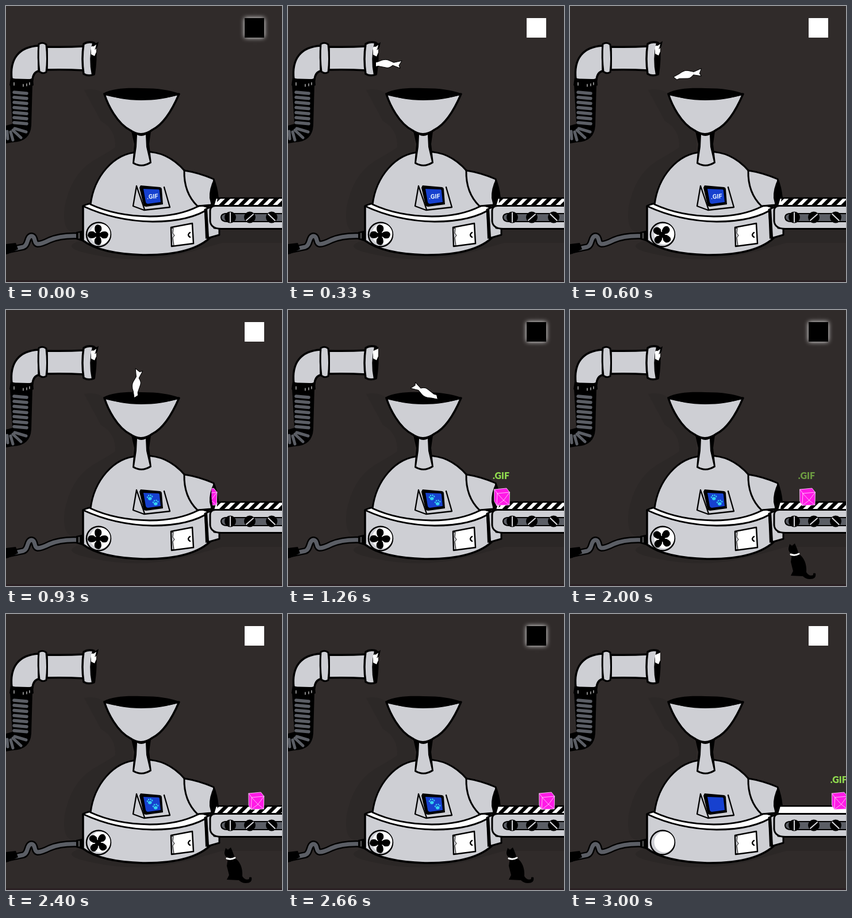
An HTML page with a canvas that plays this animation: 480 px wide and 480 px high, repeating every 3070 ms.

```html
<!DOCTYPE html>
<html lang="en">
<head>
<meta charset="utf-8">
<title>GIF machine</title>
<style>
html, body { margin: 0; width: 100%; height: 100%; overflow: hidden; background: #302b2a; }
canvas { display: block; width: 100vw; height: 100vh; }
</style>
</head>
<body>
<canvas id="stage" width="480" height="480"></canvas>
<script>
const ctx = document.getElementById('stage').getContext('2d');
const LOOP = 3070, FRAMES = 46;
const BACK = '#302b2a', GREY = '#cecfd4', DARK = '#5b5e65', INK = '#000', PINK = '#ff1ae6';

function shape(d, fill, stroke, width = 3) {
  const p = new Path2D(d);
  if (fill) { ctx.fillStyle = fill; ctx.fill(p); }
  if (stroke) { ctx.strokeStyle = stroke; ctx.lineWidth = width; ctx.stroke(p); }
}

function oval(x, y, rx, ry, fill, stroke, width = 3) {
  ctx.beginPath();
  ctx.ellipse(x, y, rx, ry, 0, 0, Math.PI * 2);
  if (fill) { ctx.fillStyle = fill; ctx.fill(); }
  if (stroke) { ctx.strokeStyle = stroke; ctx.lineWidth = width; ctx.stroke(); }
}

function at(x, y, turn, draw) {
  ctx.save();
  ctx.translate(x, y);
  ctx.rotate(turn);
  draw();
  ctx.restore();
}

// Value between [frame, value] stops
function track(f, stops) {
  if (f <= stops[0][0]) return stops[0][1];
  for (let k = 1; k < stops.length; k++) {
    const [a, u] = stops[k - 1], [b, v] = stops[k];
    if (f <= b) return u + (v - u) * (f - a) / (b - a);
  }
  return stops[stops.length - 1][1];
}

function backdrop() {
  ctx.fillStyle = BACK;
  ctx.fillRect(0, 0, 480, 480);
  shape('M136 146 Q160 142 172 154 L220 226 V254 L150 345 L134 400 L112 392 Q98 385 102 350 Q112 295 150 270 Q178 254 190 246 Q192 215 165 200 Z', '#2c2827');
  shape('M130 408 Q90 420 150 432 Q240 452 330 425 L376 412 H480 V384 H360 Z', '#2b2726');
  ctx.fillStyle = '#2a2023';
  ctx.fillRect(0, 477, 480, 3);
}

function hose() {
  shape('M7 136 H46 L44 208 Q42 236 12 237 L0 239 V208 L11 205 Z', INK);
  for (let k = 0; k < 7; k++) {
    const y = 150 + k * 8.8;
    shape(`M14 ${y} L36 ${y + 2}`, null, DARK, 5.5);
  }
  shape('M15 213 L35 219 M12 216 L26 229 M8 219 L12 233 M2 218 L3 231', null, DARK, 5);
}

function pipe(f) {
  hose();
  shape('M10 128 C6 92 22 71 57 69 V113 Q47 115 46 129 Z', GREY, INK, 3.5);
  shape('M8 124 Q28 133 47 125 L48 138 Q27 147 6 138 Z', INK);
  shape('M14 133 v5 M30 136 v4 M36 135 v4 M41 133 v4', null, '#ddd', 1.2);
  shape('M71 71 Q103 72 136 70 V112 Q103 110 71 111 Z', GREY, INK, 3.5);
  shape('M57 66 Q64 62 70 67 Q73 92 70 115 Q64 119 58 114 Q55 90 57 66 Z', GREY, INK, 3);
  shape('M135 66 Q143 61 153 64 V119 Q143 123 135 118 Q131 92 135 66 Z', GREY, INK, 3.5);
  shape('M150 64 L157 64 Q159 92 155 119 L149 120 Q143 92 150 64 Z', INK);
  const phase = f % 13, tucked = phase > 5 && phase < 8;
  const sway = Math.sin(phase / 13 * Math.PI * 2) * 1.2;
  at(0, sway, 0, () => {
    shape('M148 71 L157 67 L157 80 L154 87 L148 84 Z', '#fff');
    if (!tucked) {
      shape('M151 69 L161 62 L159 72 L155 76 Z', INK);
      shape('M150 72 L157 67 L155 75 Z', '#fff');
    }
  });
}

function cord() {
  const d = 'M0 425 Q16 422 30 419 C39 416 36 401 44 400 C52 400 48 413 55 414 Q62 414 76 407 Q96 398 130 400';
  shape(d, null, INK, 12);
  shape(d, null, DARK, 7);
  shape('M0 414 L17 412 L21 423 L4 431 L0 432 Z', INK);
  shape('M122 393 L136 390 V410 L122 406 Z', INK);
  shape('M127 395 v9', null, '#bbb', 1);
}

function fan(f) {
  oval(161, 397.5, 21, 21, GREY, INK, 2.5);
  oval(164, 396.5, 17.5, 18, '#fff');
  if (f === FRAMES - 1) return;
  // Upright and diagonal poses alternate, seven times a loop
  const upright = Math.cos(f / FRAMES * 7 * Math.PI * 2) > 0;
  at(160, 398, upright ? 0 : Math.PI / 4 - 0.1, () => {
    for (let k = 0; k < 4; k++) {
      ctx.rotate(Math.PI / 2);
      shape('M0 0 L-5 -6 Q-8 -16 -1 -18 Q8 -17 6 -8 Z', INK);
    }
    oval(0, 0, 5, 5, INK);
  });
}

function paw(x, y) {
  at(x, y, -0.15, () => {
    oval(0, 2, 3.3, 2.7, '#35d3f2');
    for (const [px, py] of [[-4, -1], [-1.5, -3.5], [2, -3.5], [4.5, -1]]) oval(px, py, 1.1, 1.5, '#35d3f2');
  });
}

function screen(f) {
  shape('M227 313 L221 349 L238 355 L284 351 L275 315 Z', GREY);
  shape('M227 313 L221 348 L240 355 L285 350 L275 315 M227 313 L241 354', null, INK, 2.3);
  shape('M234 312 L268 315 Q271 316 271 319 L273 345 L244 349 Q240 349 239 346 L232 316 Z', INK);
  shape('M239 318 L265 319 Q267 319 267 322 L269 341 L247 344 Q244 344 243 341 Z', '#1741cf');
  if (f === FRAMES - 1) return;
  if (f < 13) {
    ctx.font = 'bold 11px Roboto, sans-serif';
    ctx.fillStyle = '#e9f6ff';
    ctx.textAlign = 'center';
    at(255, 335, -0.09, () => ctx.fillText('.GIF', 0, 0));
  } else {
    paw(250, 326);
    paw(260, 335);
  }
}

function base() {
  shape('M134 348 Q145 343 160 343 H335 L355 351 L358 400 Q325 434 238 433 Q165 431 134 408 Z', GREY, INK, 3.5);
  shape('M134 348 Q145 342 160 343 L335 345 L355 351 Q320 375 255 375 Q190 374 134 348 Z', '#fff', INK, 3);
  shape('M346 354 L357 349 L362 386 L371 387 V398 L350 404 Z', GREY, INK, 3);
  shape('M345 356 L350 352 L353 402 L347 405 Z', INK);
  shape('M287 385 L324 378 L326 413 L288 418 Z', '#fff', INK, 2.5);
  shape('M288 387 L291 386 L290 395 L293 399 L290 403 L292 416 L289 417 Z', GREY, INK, 1);
  shape('M320 394 Q314 398 320 402', null, INK, 2.5);
}

function dome() {
  shape('M147 345 C153 298 186 256 230 254 C266 250 291 264 311 287 L335 348 Q300 366 250 366 Q190 365 147 345 Z', GREY, INK, 3);
  shape('M310 286 Q336 290 361 301 Q368 322 357 346 L333 348 Q309 325 310 286 Z', GREY, INK, 3);
  shape('M362 300 Q353 318 354 334 L357 347 L370 347 L370 334 Q368 314 362 300 Z', INK);
}

function funnel() {
  shape('M218 218 L252 218 L249 240 L253 273 Q236 284 220 274 L223 240 Z', INK);
  shape('M228 224 Q235 228 243 224 L244 245 L250 271 Q236 280 223 272 L227 245 Z', GREY);
  shape('M171 153 C177 172 193 204 216 216 Q235 230 255 215 C277 204 292 174 301 153 Q236 170 171 153 Z', GREY, INK, 3.5);
  shape('M169 152 C185 143 210 142 235 143 C265 143 285 146 303 153 C282 161 258 164 235 164 C210 164 188 160 169 152 Z', INK);
}

function belt(f) {
  shape('M366 334 H480 V348 H362 Z', '#fff');
  if (f < FRAMES - 1) {
    ctx.save();
    ctx.clip(new Path2D('M368 334 H480 V346 H366 Z'));
    const shift = f * 3.7 % 17;
    for (let x = 334 + shift; x < 500; x += 17) {
      shape(`M${x} 348 l15 -15 h9 l-15 15 Z`, INK);
    }
    ctx.restore();
  }
  shape('M366 334 H480', null, INK, 2.5);
  shape('M485 347.5 H364 Q355 348 355 356 V374 Q356 387 374 387.5 H485 Z', GREY, INK, 3);
  shape('M485 361 H381 Q374 362 374 368 Q375 375 384 375 H485 Z', DARK, INK, 2);
  for (const [x, turn] of [[390, 0], [424, 0.85], [462, -0.8]]) {
    oval(x, 367.5, 10, 10, INK);
    at(x, 367.5, turn, () => shape('M0 -8 V8', null, '#d8d8dc', 2));
  }
}

function cube(f) {
  if (f < 13) return;
  const x = 372 + (f - 19) * 3.72;
  ctx.save();
  ctx.clip(new Path2D('M359 280 H480 V350 H362 Q354 325 359 300 Z'));
  at(x, 325, 0, () => {
    shape('M-13 -13 L8 -15 L13.5 -8 L13 14 L-9 15 L-13 8 Z', PINK);
    shape('M-13 -13 L8 -15 L13.5 -8 L13 14 L-9 15 L-13 8 Z M-13 -13 L-8 -6 L13.5 -8 M-8 -6 L-9 15 M-8 -6 L3 6 L13 14 M13.5 -8 L3 6 L-9 15', null, '#ffc9fa', 0.9);
  });
  ctx.restore();

  const glow = 0.15 + 1.1 * Math.cos((f - 19.3) / 13 * Math.PI * 2);
  ctx.globalAlpha = Math.max(0, Math.min(1, glow));
  ctx.font = '900 16px Lato, sans-serif';
  ctx.fillStyle = '#8fd94e';
  ctx.textAlign = 'center';
  ctx.fillText('.GIF', x - 1.5, 294);
  ctx.globalAlpha = 1;
}

function fish(f) {
  if (f < 3 || f > 24) return;
  const x = track(f, [[3, 156], [9, 204], [14, 226], [19, 238], [24, 242]]);
  const y = track(f, [[3, 90], [6, 104], [9, 118], [14, 128], [19, 144], [24, 178]]);
  const turn = track(f, [[3, 0.1], [9, -0.22], [19, -2.68], [24, -3.6]]);
  ctx.save();
  ctx.clip(new Path2D('M153 0 H480 V153 H303 Q270 163 235 163 Q195 162 169 152 H153 Z'));
  at(x, y, turn, () => {
    shape('M-25 0 L-14 -3 Q-4 -8 3 -5 L12 -1 L26 -4 L21 4 L23 9 L10 4 Q4 9 -1 8 L-15 5 L-20 6 Z', '#fff', INK, 1);
  });
  ctx.restore();
}

function sittingCat() {
  shape('M380 414 L382 407 L386 410 L391 406 L394 413 L398 424 C407 431 412 441 411 456 Q416 464 423 461 Q422 456 427 458 Q429 468 417 468 Q410 468 405 463 L384 462 L388 454 L384 438 L386 425 Q379 420 380 414 Z', INK);
  shape('M384 425 Q391 428 398 424', null, '#fff', 3);
}

function walkingCat(x, f) {
  const step = Math.sin(f * 1.1) * 5;
  at(x, 0, 0, () => {
    shape('M-1 424 L6 428 L14 427 L19 422 L21 432 Q35 434 50 439 Q66 437 74 446 L92 453 V459 L78 459 Q72 463 62 460 Q45 462 25 459 Q14 455 12 446 Q2 442 0 434 Z', INK);
    for (const [top, side] of [[19, 2], [30, -1], [56, 1], [66, -1]]) {
      const foot = top + side * step;
      shape(`M${top} 452 L${(top + foot) / 2 + 2} 458 L${foot} 463 L${foot - 3} 464`, null, INK, 5.5);
    }
    shape('M11 441 Q17 441 20 437', null, '#fff', 2);
  });
}

function cat(f) {
  if (f < 20 || f === FRAMES - 1) return;
  if (f < 29) walkingCat(400 + (26 - f) * 12, f);
  else sittingCat();
}

function badge(f) {
  const dark = Math.floor(f / 4.6) % 2 === 0;
  ctx.save();
  if (dark) { ctx.shadowColor = '#fff'; ctx.shadowBlur = 8; }
  ctx.fillStyle = dark ? INK : '#fff';
  ctx.fillRect(415, 21, 34, 34);
  ctx.restore();
}

function draw(now) {
  const t = now % LOOP;
  const f = Math.min(FRAMES - 1, Math.ceil((Math.floor(t / 10) + 1) * 0.15 - 1e-6) - 1);
  ctx.lineJoin = ctx.lineCap = 'round';
  backdrop();
  pipe(f);
  cord();
  base();
  dome();
  funnel();
  screen(f);
  fan(f);
  belt(f);
  cube(f);
  fish(f);
  cat(f);
  badge(f);
}

const start = performance.now();
function tick() {
  draw(performance.now() - start);
  requestAnimationFrame(tick);
}
tick();
</script>
</body>
</html>
```
